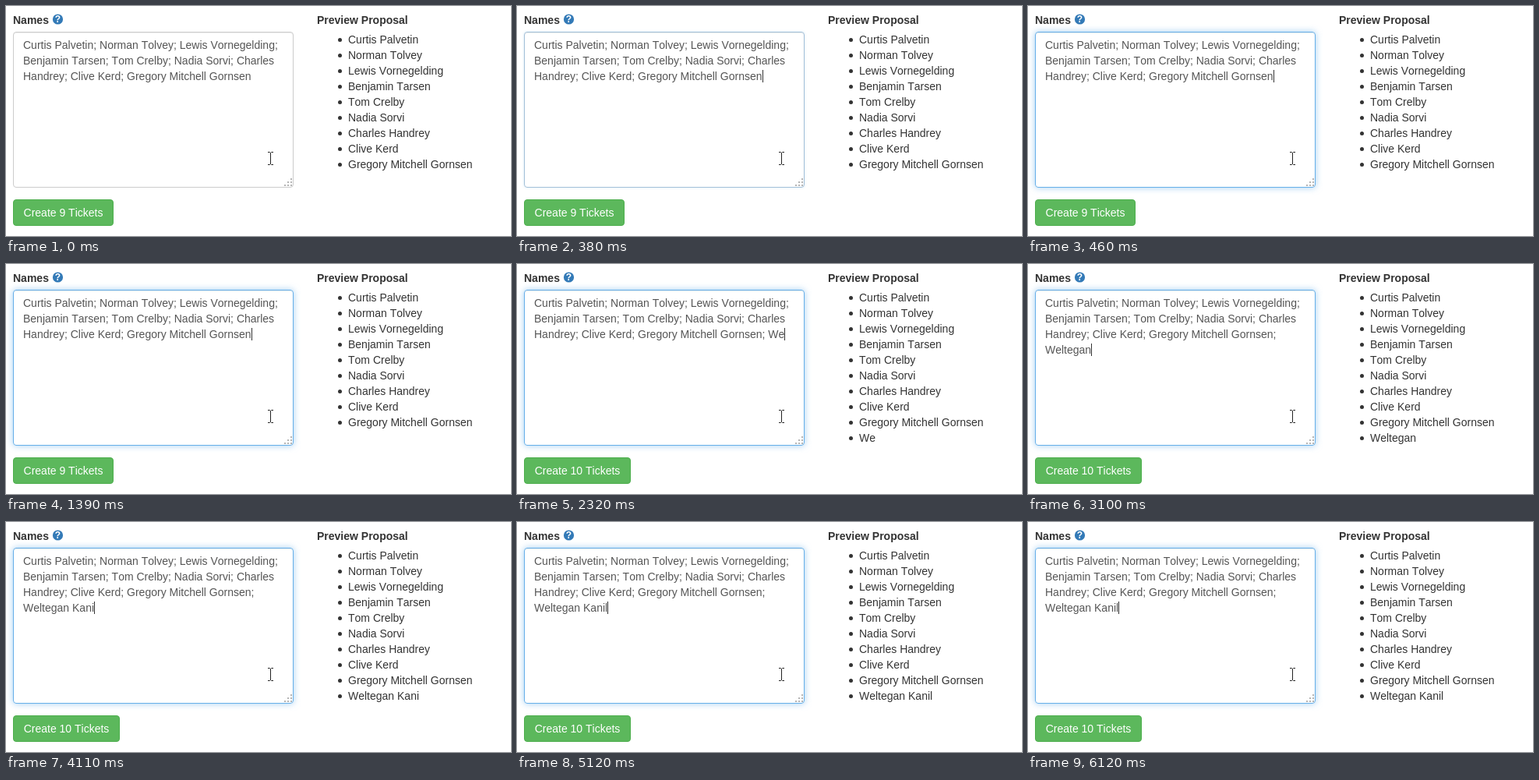
An HTML page that plays this animation: 648 px wide and 295 px high, repeating every 6590 ms.

```html
<!DOCTYPE html>
<html lang="en">
<head>
<meta charset="utf-8">
<title>Ticket names</title>
<style>
  html, body { margin: 0; width: 100%; height: 100%; overflow: hidden; background: #fff; }
  body { position: relative; font: 14px/20px "Liberation Sans", Arial, sans-serif; font-kerning: none; color: #333; }
  body > * { position: absolute; box-sizing: border-box; }
  b { top: 8px; white-space: nowrap; }
  #field {
    left: 9px; top: 33px; width: 360px; height: 200px; padding: 6px 12px;
    border: 1px solid; border-radius: 4px; color: #555; white-space: pre-wrap;
  }
  #caret { position: absolute; width: 1px; height: 16px; margin-top: 2px; background: #333; }
  #button {
    left: 9px; top: 248px; height: 34px; padding: 6px 12px; white-space: nowrap;
    border: 1px solid #4cae4c; border-radius: 4px; background: #5cb85c; color: #fff; text-align: center;
  }
  ul { left: 399px; top: 33px; margin: 0; padding: 0 0 0 40px; list-style: none; white-space: nowrap; }
  li { position: relative; }
  li::before {
    content: ""; position: absolute; left: -13px; top: 8px;
    width: 5px; height: 5px; border-radius: 50%; background: #333;
  }
  svg { left: 0; top: 0; }
</style>
</head>
<body>
<b style="left:9px">Names</b>
<b style="left:399px">Preview Proposal</b>
<div id="field"><span id="text"></span><span id="caret"></span></div>
<div id="button"></div>
<ul id="preview"></ul>
<svg width="648" height="295">
  <circle cx="66.5" cy="17" r="6.6" fill="#337ab7"/>
  <text x="66.5" y="21.3" fill="#fff" font-size="12" font-weight="bold" text-anchor="middle">?</text>
  <path id="grip" fill="#b4b4b4"/>
  <path d="M336 187.5h2.5l1 1l1-1h2.5M339.5 188v15M336 203.5h2.5l1-1l1 1h2.5" fill="none" stroke="#222"/>
</svg>
<script>
const LOOP = 6590;
const names = ["Curtis Palvetin", "Norman Tolvey", "Lewis Vornegelding", "Benjamin Tarsen", "Tom Crelby",
  "Nadia Sorvi", "Charles Handrey", "Clive Kerd", "Gregory Mitchell Gornsen"].join("; ");
const typed = "; Weltegan Kanil";
const keyTimes = [1860, 1940, 2010, 2320, 2470, 2550, 2780, 2940, 3020, 3100, 3260, 3490, 3800, 3880, 4030, 4190];
// The preview trails the field by one tick after these two keys.
const previewTimes = keyTimes.map(t => t === 3490 || t === 4030 ? t + 80 : t);
const caretToggles = [300, 850, 1390, 4580, 5120, 5660, 6120];

const [field, text, caret, button, preview, grip] =
  ["field", "text", "caret", "button", "preview", "grip"].map(id => document.getElementById(id));

let dots = "";
for (let row = 0; row < 3; row++)
  for (let col = 2 - row; col < 3; col++)
    dots += `M${357 + col * 4} ${221 + row * 4}h2v2h-2z`;
grip.setAttribute("d", dots);

const passed = (times, t) => times.filter(time => time <= t).length;
const contentAt = (times, t) => names + typed.slice(0, passed(times, t));
const mix = (a, b, p) => Math.round(a + (b - a) * p);

function drawFocus(t) {
  const p = [0, 0.05, 0.4, 1][passed([300, 380, 460], t)];
  field.style.borderColor = `rgb(${mix(204, 102, p)},${mix(204, 175, p)},${mix(204, 233, p)})`;
  field.style.boxShadow =
    `inset 0 1px 1px rgba(0,0,0,.075), 0 0 ${8 * p}px rgba(102,175,233,${0.6 * p})`;
}

let shownPreview = "";
function drawPreview(content) {
  if (content === shownPreview) return;
  shownPreview = content;
  const entries = content.split(";").map(s => s.trim()).filter(Boolean);
  preview.replaceChildren(...entries.map(entry => {
    const item = document.createElement("li");
    item.textContent = entry;
    return item;
  }));
  button.textContent = `Create ${entries.length} Tickets`;
  button.style.width = entries.length > 9 ? "137px" : "129px";
}

function draw(now) {
  const t = now % LOOP;
  drawFocus(t);
  text.textContent = contentAt(keyTimes, t);
  caret.style.visibility = passed(caretToggles, t) % 2 ? "visible" : "hidden";
  drawPreview(contentAt(previewTimes, t));
  requestAnimationFrame(draw);
}
draw(performance.now());
</script>
</body>
</html>
```
